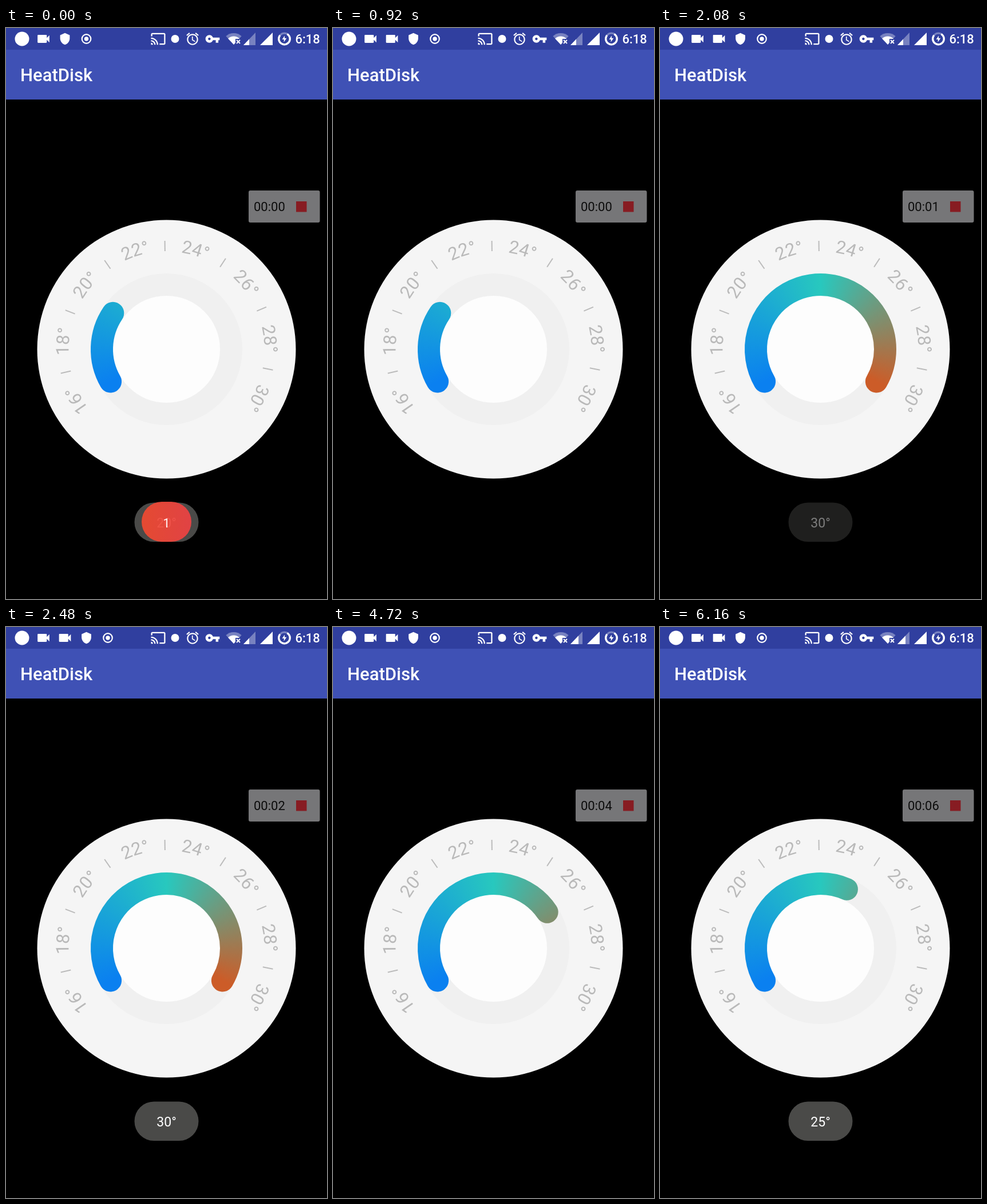
An HTML page with a canvas that plays this animation: 561 px wide and 998 px high, repeating every 6.2 s.

```html
<!DOCTYPE html>
<html lang="en">
<head>
<meta charset="utf-8">
<title>Thermostat dial</title>
<style>
html, body { margin: 0; width: 100%; height: 100%; overflow: hidden; background: #000; }
canvas { display: block; width: 561px; height: 998px; }
</style>
</head>
<body>
<canvas id="stage" width="561" height="998"></canvas>
<script>
const c = document.getElementById("stage").getContext("2d");
const LOOP = 6200, TAU = Math.PI * 2, CX = 280.5, CY = 561.5;
const rad = deg => deg * Math.PI / 180;
const clamp = v => Math.min(1, Math.max(0, v));

const ICONS = {
  camera: "M17 10.5V7c0-.55-.45-1-1-1H4c-.55 0-1 .45-1 1v10c0 .55.45 1 1 1h12c.55 0 1-.45 1-1v-3.5l4 4v-11l-4 4z",
  shield: "M12 1L3 5v6c0 5.55 3.84 10.74 9 12 5.16-1.26 9-6.45 9-12V5l-9-4z",
  cast: "M21 3H3c-1.1 0-2 .9-2 2v3h2V5h18v14h-7v2h7c1.1 0 2-.9 2-2V5c0-1.1-.9-2-2-2zM1 18v3h3c0-1.66-1.34-3-3-3zm0-4v2c2.76 0 5 2.24 5 5h2c0-3.87-3.13-7-7-7zm0-4v2c4.97 0 9 4.03 9 9h2c0-6.08-4.93-11-11-11z",
  alarm: "M22 5.72l-4.6-3.86-1.29 1.53 4.6 3.86L22 5.72zM7.88 3.39L6.6 1.86 2 5.71l1.29 1.53 4.59-3.85zM12.5 8H11v6l4.75 2.85.75-1.23-4-2.37V8zM12 4c-4.97 0-9 4.03-9 9s4.02 9 9 9 9-4.03 9-9-4.03-9-9-9zm0 16c-3.87 0-7-3.13-7-7s3.13-7 7-7 7 3.13 7 7-3.13 7-7 7z",
  key: "M12.65 10C11.83 7.67 9.61 6 7 6c-3.31 0-6 2.69-6 6s2.69 6 6 6c2.61 0 4.83-1.67 5.65-4H17v4h4v-4h2v-4H12.65zM7 14c-1.1 0-2-.9-2-2s.9-2 2-2 2 .9 2 2-.9 2-2 2z",
  bolt: "M13 3L6 13.5h5L10.5 21 18 10h-5.5z"
};
for (const name in ICONS) ICONS[name] = new Path2D(ICONS[name]);

function icon(name, x, y, scale) {
  c.save();
  c.translate(x - 12 * scale, y - 12 * scale);
  c.scale(scale, scale);
  c.fillStyle = "#fff";
  c.fill(ICONS[name]);
  c.restore();
}

function disc(x, y, r, color) {
  c.fillStyle = color;
  c.beginPath();
  c.arc(x, y, r, 0, TAU);
  c.fill();
}

function arc(x, y, r, from, to, width, color) {
  c.strokeStyle = color;
  c.lineWidth = width;
  c.beginPath();
  c.arc(x, y, r, rad(from), rad(to));
  c.stroke();
}

function poly(points, color) {
  c.fillStyle = color;
  c.beginPath();
  points.forEach(([x, y]) => c.lineTo(x, y));
  c.fill();
}

function box(x, y, w, h, r, color) {
  c.fillStyle = color;
  c.beginPath();
  c.roundRect(x, y, w, h, r);
  c.fill();
}

function text(str, x, y, size, color, align = "left", weight = 400) {
  c.font = `${weight} ${size}px Roboto, sans-serif`;
  c.textAlign = align;
  c.fillStyle = color;
  c.fillText(str, x, y);
}

function fan(r, color) {
  c.fillStyle = color;
  c.beginPath();
  c.moveTo(398, 29);
  c.arc(398, 29, r, rad(-133), rad(-47));
  c.fill();
}

function statusBar(t) {
  box(0, 0, 561, 38, 0, "#303f9f");
  disc(28, 19, 12.5, "#fff");
  icon("camera", 65.5, 19, 1.15);
  const shift = t >= 240 ? 37.5 : 0;
  if (shift) icon("camera", 103, 19, 1.15);
  icon("shield", 103 + shift, 19, 0.93);
  arc(140.5 + shift, 19, 7.8, 0, 360, 2.2, "#fff");
  disc(140.5 + shift, 19, 3.7, "#fff");

  icon("cast", 266, 19, 1.14);
  disc(295.5, 19, 7, "#fff");
  icon("alarm", 326, 19, 1.08);
  icon("key", 361, 19, 1.12);

  const dim = "rgba(255,255,255,.35)";
  fan(20, dim);
  fan(14.5, "#fff");
  box(401, 19, 11, 11, 0, "#303f9f");
  c.strokeStyle = "#fff";
  c.lineWidth = 2;
  c.beginPath();
  c.moveTo(403, 21); c.lineTo(409, 27);
  c.moveTo(409, 21); c.lineTo(403, 27);
  c.stroke();

  const level = t < 4120 ? 425 : 429;
  poly([[415, 30], [436, 8], [436, 30]], dim);
  poly([[415, 30], [level, 30 - (level - 415) * 22 / 21], [level, 30]], "#fff");
  poly([[444, 30], [466, 8], [466, 30]], "#fff");
  arc(486.5, 19, 9.8, 0, 360, 3.2, dim);
  arc(486.5, 19, 9.8, -60, 220, 3.2, "#fff");
  icon("bolt", 486.5, 19, 0.65);
  text("6:18", 505.5, 27, 22, "#fff", "left", 500);
}

// Write a label along the dial, centred on an angle.
function curvedLabel(str, angle) {
  c.font = "400 31px Roboto, sans-serif";
  c.textAlign = "center";
  c.fillStyle = "#b9b9b9";
  const base = 171, deg = 180 / Math.PI / base;
  let at = angle - c.measureText(str).width * deg / 2;
  for (const ch of str) {
    const half = c.measureText(ch).width * deg / 2;
    c.save();
    c.translate(CX, CY);
    c.rotate(rad(at + half + 90));
    c.fillText(ch, 0, -base);
    c.restore();
    at += half * 2;
  }
}

const sweepColor = c.createConicGradient(rad(90), CX, CY);
[[0, "#0a80f0"], [1 / 6, "#0a80f0"], [0.5, "#28c8be"], [5 / 6, "#cc5c28"], [1, "#cc5c28"]]
  .forEach(([at, color]) => sweepColor.addColorStop(at, color));

const STEP = 16;
const easeOut = u => 1 - (1 - clamp(u)) ** 3;

function level(t) {
  const up = Math.round(11 * easeOut((t - 920) / 600));
  const down = Math.round(6 * easeOut((t - 4520) / 600));
  return 4 + up - down;
}

function dial(t) {
  disc(CX, CY, 226, "#f5f5f5");
  disc(CX, CY, 132.5, "#f0f0f0");
  disc(CX, CY, 93.5, "#fdfdfd");
  for (let i = 0; i < 8; i++) {
    curvedLabel(16 + 2 * i + "°", 150.3 + 33.98 * i);
    if (i === 7) break;
    c.save();
    c.translate(CX, CY);
    c.rotate(rad(167.2 + 33.97 * i));
    box(171.5, -1, 18, 2, 0, "#bbb");
    c.restore();
  }
  c.lineCap = "round";
  arc(CX, CY, 113, 150, 150 + STEP * level(t), 39, sweepColor);
  c.lineCap = "butt";
}

const fadeIn = (t, start) => 1 - (1 - clamp((t - start) / 500)) ** 2;
const fadeOut = (t, start) => 1 - clamp((t - start) / 500) ** 2;

function toast(t) {
  let value = 20, alpha = fadeOut(t, 40);
  if (t >= 5000) {
    value = 25;
    alpha = fadeIn(t, 5165);
  } else if (t >= 1000) {
    value = 30;
    alpha = fadeIn(t, 1960) * fadeOut(t, 3890);
  }
  c.globalAlpha = alpha;
  box(224.5, 829.5, 112, 68.5, 34, "#4a4a48");
  text(value + "°", 280.5, 873, 23, "#fff", "center");

  c.globalAlpha = 0.93 * clamp(1 - (t - 20) / 200);
  const red = c.createLinearGradient(237, 0, 324, 0);
  red.addColorStop(0, "#f04a30");
  red.addColorStop(1, "#ec4244");
  box(237, 828, 87, 70, 35, red);
  text("1", 280.5, 873, 22, "#fff", "center");
  c.globalAlpha = 1;
}

function draw(now) {
  const t = now % LOOP;
  box(0, 0, 561, 998, 0, "#000");
  box(0, 38, 561, 87, 0, "#3f51b5");
  text("HeatDisk", 25, 93, 31, "#fff", "left", 500);
  statusBar(t);
  dial(t);
  box(424, 284, 124.5, 56, 3, "#767678");
  const seconds = Math.max(0, Math.floor((t - 120) / 1000));
  text("00:0" + seconds, 433, 320, 22, "#0c0c0c");
  box(507, 303, 18.5, 18.5, 0, "#871c22");
  toast(t);
}

const start = performance.now();
function frame() {
  draw(performance.now() - start);
  requestAnimationFrame(frame);
}
frame();
</script>
</body>
</html>
```
